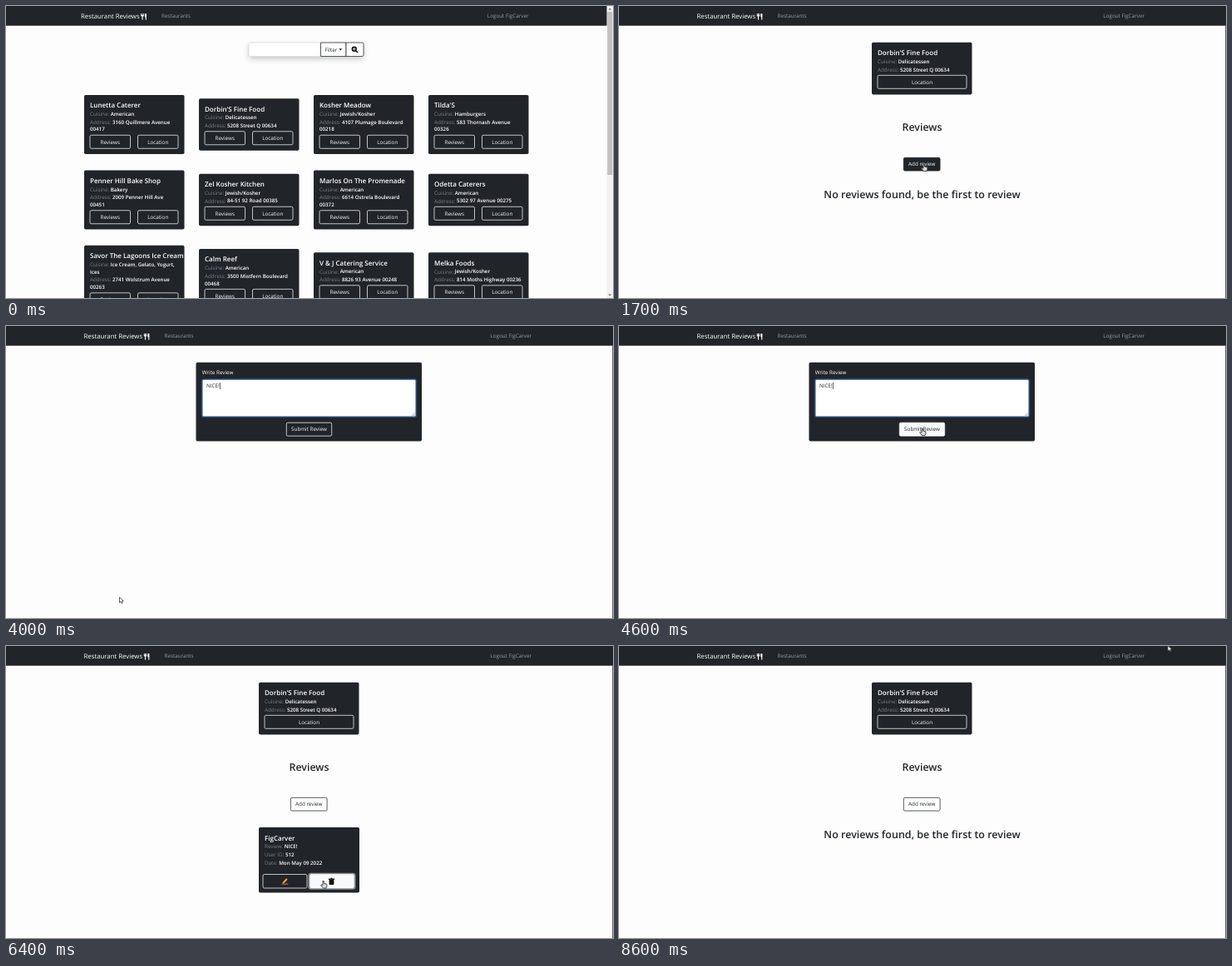
Animation, 730 px wide and 351 px high, one loop 9200 ms. Source, as an HTML page with a canvas:

```html
<!DOCTYPE html>
<html lang="en">
<head>
<meta charset="utf-8">
<title>Restaurant Reviews</title>
<style>
  html, body { margin: 0; width: 100%; height: 100%; overflow: hidden; background: #fdfdfd; }
  canvas { display: block; width: 730px; height: 351px; }
</style>
</head>
<body>
<canvas id="stage"></canvas>
<script>
const W = 730, H = 351, LOOP = 9200, STEP = 100;
const DARK = '#212529', LIGHT = '#f8f9fa', PAGE = '#fdfdfd', MUTED = '#7b8187';
const USER = 'FigCarver';
const SHOP = { name: "Dorbin'S Fine Food", cuisine: ['Delicatessen'], address: ['5208 Street Q 00634'] };

const canvas = document.getElementById('stage');
const dpr = window.devicePixelRatio || 1;
canvas.width = W * dpr;
canvas.height = H * dpr;
const ctx = canvas.getContext('2d');
ctx.scale(dpr, dpr);
ctx.textRendering = 'geometricPrecision';

const shop = (name, cuisine, address) =>
  ({ name, cuisine: cuisine.split('|'), address: address.split('|') });

const SHOPS = [
  shop('Lunetta Caterer', 'American', '3160 Quillmere Avenue|00417'),
  SHOP,
  shop('Kosher Meadow', 'Jewish/Kosher', '4107 Plumage Boulevard|00218'),
  shop("Tilda'S", 'Hamburgers', '583 Thornash Avenue|00326'),
  shop('Penner Hill Bake Shop', 'Bakery', '2009 Penner Hill Ave|00451'),
  shop('Zel Kosher Kitchen', 'Jewish/Kosher', '84-51 92 Road 00385'),
  shop('Marlos On The Promenade', 'American', '6614 Ostrela Boulevard|00372'),
  shop('Odetta Caterers', 'American', '5302 97 Avenue 00275'),
  shop('Savor The Lagoons Ice Cream', 'Ice Cream, Gelato, Yogurt,|Ices', '2741 Wolstrum Avenue|00263'),
  shop('Calm Reef', 'American', '3500 Mistfern Boulevard|00468'),
  shop('V & J Catering Service', 'American', '8826 93 Avenue 00248'),
  shop('Melka Foods', 'Jewish/Kosher', '814 Moths Highway 00236')
];

// Draws text with its capitals centred on y; returns the width.
function text(str, x, y, size = 6.3, color = '#fff', weight = 400, align = 'left') {
  ctx.font = `${weight} ${size}px "Open Sans", "Noto Sans", sans-serif`;
  ctx.textAlign = align;
  ctx.fillStyle = color;
  ctx.fillText(str, x, y + size * 0.36);
  return ctx.measureText(str).width;
}

function box(x, y, w, h, r, fill, stroke, line = 0.75) {
  ctx.beginPath();
  ctx.roundRect(x, y, w, h, r);
  if (fill) { ctx.fillStyle = fill; ctx.fill(); }
  if (stroke) { ctx.strokeStyle = stroke; ctx.lineWidth = line; ctx.stroke(); }
}

function shape(points, fill, stroke, line = 0.8) {
  ctx.beginPath();
  points.forEach(([x, y]) => ctx.lineTo(x, y));
  ctx.closePath();
  if (fill) { ctx.fillStyle = fill; ctx.fill(); }
  if (stroke) { ctx.strokeStyle = stroke; ctx.lineWidth = line; ctx.stroke(); }
}

function at(x, y, draw) {
  ctx.save();
  ctx.translate(x, y);
  draw();
  ctx.restore();
}

function button(label, x, y, w, h, { ink = LIGHT, fill = null, hover = false } = {}) {
  const hoverInk = ink === LIGHT ? DARK : '#fff';
  box(x, y, w, h, 1.6, hover ? ink : fill, ink);
  text(label, x + w / 2, y + h / 2, 6.3, hover ? hoverInk : ink, 400, 'center');
}

const card = (x, y, w, h) => box(x, y, w, h, 1.8, DARK);

// A muted label followed by bold lines; returns the next row position.
function field(label, lines, x, y) {
  const w = text(label + ' ', x, y, 6.3, MUTED);
  lines.forEach((line, i) => text(line, i ? x : x + w, y + i * 8.7, 6.2, '#fff', 600));
  return y + (lines.length - 1) * 8.7 + 9.6;
}

function shopCard(s, x, y, h, hover) {
  card(x, y, 120.5, h);
  text(s.name, x + 7, y + 12.5, 8, '#fff', 600);
  let row = field('Cuisine:', s.cuisine, x + 7, y + 23);
  row = field('Address:', s.address, x + 7, row) - 2.6;
  return row;
}

function fork(x, y) {
  at(x, y, () => {
    ctx.fillStyle = '#fff';
    for (const dx of [0, 1.3, 2.6]) ctx.fillRect(dx, -3.6, 0.8, 3);
    box(0, -1.6, 3.4, 1.6, 0.8, '#fff');
    ctx.fillRect(1.2, -0.6, 1.1, 4.6);
    box(4.6, -3.7, 2, 4.6, 0.9, '#fff');
    ctx.fillRect(5.4, 0, 1.1, 4);
  });
}

function navbar(dx) {
  ctx.fillStyle = DARK;
  ctx.fillRect(0, 0, W, 23.7);
  text('Restaurant Reviews', 90 + dx, 12.3, 7.8);
  fork(162.3 + dx, 12.6);
  text('Restaurants', 187 + dx, 12, 6.3, '#9b9d9f');
  text('Logout ' + USER, 628.5 + dx, 12, 6.3, '#9b9d9f', 400, 'right');
}

function search() {
  ctx.save();
  ctx.shadowColor = 'rgba(0,0,0,.22)';
  ctx.shadowBlur = 7 * dpr;
  ctx.shadowOffsetY = 3 * dpr;
  box(292, 44, 138, 16.5, 1.8, '#fff');
  ctx.restore();
  box(292, 44, 86.5, 16.5, 1.6, '#fff', '#ced4da', 0.6);
  box(378.5, 44, 30.5, 16.5, 0, '#fff', DARK);
  box(409, 44, 21, 16.5, [0, 1.6, 1.6, 0], '#fff', DARK);
  text('Filter', 383.5, 52.3, 6.3, DARK);
  shape([[400.3, 51.3], [404.3, 51.3], [402.3, 53.4]], DARK);
  ctx.strokeStyle = ctx.fillStyle = '#111';
  ctx.beginPath();
  ctx.arc(418.8, 51.8, 3.2, 0, 7);
  ctx.fill();
  ctx.lineWidth = 1.6;
  ctx.beginPath();
  ctx.moveTo(420.5, 53.5);
  ctx.lineTo(423, 56);
  ctx.stroke();
  ctx.fillStyle = '#fff';
  ctx.fillRect(417, 51.4, 3.6, 0.8);
  ctx.fillRect(418.4, 50, 0.8, 3.6);
}

function scrollbar() {
  ctx.fillStyle = '#f1f1f1';
  ctx.fillRect(722.5, 0, 7.5, H);
  ctx.fillStyle = '#c1c1c1';
  ctx.fillRect(723.2, 7, 6, 196);
  shape([[724.3, 4.6], [728, 4.6], [726.2, 2.6]], '#666');
  shape([[724.3, 346.4], [728, 346.4], [726.2, 348.4]], '#666');
}

function listPage(t) {
  navbar(0);
  search();
  SHOPS.forEach((s, i) => {
    const extra = s.cuisine.length + s.address.length - 2;
    const h = 62.7 + extra * 8.4;
    const x = 94 + (i % 4) * 138;
    const y = [142.5, 233, 327.6][i / 4 | 0] - h / 2;
    const row = shopCard(s, x, y, h);
    button('Reviews', x + 7, row, 48.5, 16, { hover: s === SHOP && t >= 400 });
    button('Location', x + 64.5, row, 48.5, 16);
  });
  scrollbar();
}

function innerPage() {
  navbar(3.5);
  ctx.fillStyle = '#4a4d50';
  ctx.fillRect(729.2, 23.7, 0.8, H);
}

function spinner(angle) {
  innerPage();
  ctx.strokeStyle = DARK;
  ctx.lineWidth = 1.8;
  ctx.beginPath();
  ctx.arc(359, 175.2, 9.8, angle + Math.PI / 4, angle + Math.PI * 7 / 4);
  ctx.stroke();
}

function pencil(x, y) {
  at(x, y, () => {
    shape([[-2.6, 1], [1.6, -3.4], [3.2, -1.9], [-1, 2.4], [-3, 2.7]], '#f2a33c');
    ctx.fillStyle = '#e8862e';
    ctx.fillRect(-3.8, 3, 7.6, 0.9);
  });
}

function trash(x, y, ink) {
  at(x, y, () => {
    box(-2.9, -2.2, 5.8, 6.2, 0.8, ink);
    ctx.fillRect(-3.7, -3.4, 7.4, 1.3);
    ctx.fillRect(-1.2, -4.2, 2.4, 1);
    ctx.fillStyle = '#f2a33c';
    ctx.fillRect(2.5, -2, 0.9, 2.2);
    ctx.fillRect(-3.5, -2, 0.8, 1.4);
  });
}

function reviewCard(hover) {
  card(304, 218, 121, 78.6);
  text(USER, 311, 231, 8, '#fff', 600);
  field('Review:', ['NICE!'], 311, 241.2);
  field('User ID:', ['512'], 311, 251);
  field('Date:', ['Mon May 09 2022'], 311, 260.7);
  box(309, 274.5, 53, 16.5, 1.6, null, LIGHT);
  pencil(335.5, 282.7);
  if (hover) box(364.3, 273.6, 55.4, 18.4, 2.4, null, '#8d9194', 1.6);
  box(365.5, 274.5, 53, 16.5, 1.6, hover ? LIGHT : null, LIGHT);
  trash(391.5, 283, hover ? '#111' : '#000');
}

function shopPage(t) {
  innerPage();
  const row = shopCard(SHOP, 304, 43.7, 62.7);
  button('Location', 311, row, 107, 16);
  text('Reviews', 364.5, 145.2, 12.4, DARK, 600, 'center');
  button('Add review', 342.3, 182.3, 43.8, 15.8, { ink: DARK, fill: '#fff', hover: t >= 1500 && t < 1800 });
  if (t >= 5500 && t < 6600) reviewCard(t >= 6200);
  else text('No reviews found, be the first to review', 364.5, 226.8, 12.5, DARK, 600, 'center');
}

function typed(t) {
  if (t < 3100) return 'addReview';
  if (t < 3600) return ['N', 'NI', 'NICE'][Math.min(2, Math.floor((t - 3100) / 100))];
  return 'NICE!';
}

function writePage(t) {
  innerPage();
  card(228.5, 43.7, 271.5, 94.8);
  text('Write Review', 235.7, 55.9);
  box(235.7, 64, 257.6, 45.3, 1.8, '#fff', '#2f4f86', 1.6);
  const value = typed(t);
  const w = text(value, 241, 72.2, 6.3, DARK);
  ctx.fillStyle = '#222';
  if (t < 3100) ctx.fillRect(241, 76, w, 0.6);
  ctx.fillRect(t < 3100 ? 240.6 : 241.3 + w, 68, 0.7, 8);
  ctx.strokeStyle = '#777';
  ctx.lineWidth = 0.6;
  ctx.beginPath();
  for (const d of [1.6, 3.6]) {
    ctx.moveTo(491.8 - d, 108);
    ctx.lineTo(491.8, 108 - d);
  }
  ctx.stroke();
  button('Submit Review', 337.3, 116.2, 54.4, 16, { hover: t >= 4500 });
}

const pointers = {
  arrow() {
    shape([[0, 0], [0, 6.6], [1.6, 5.2], [2.7, 7.4], [3.8, 6.8], [2.8, 4.8], [4.8, 4.6]], '#fff', '#333');
  },
  hand() {
    shape([[0, 0], [1.2, 0], [1.4, 3], [4.8, 3.8], [4.9, 6.2], [4, 8.6], [0.4, 8.6], [-2.4, 5], [-1.6, 4.2], [0, 5.2]],
      '#ddd', '#3a3a3a', 0.9);
  },
  beam() {
    ctx.fillStyle = '#555';
    ctx.fillRect(-0.3, -4, 0.7, 8);
  }
};

// Pointer strokes: start, end, from, to, pointer on arrival.
const MOVES = [
  [100, 500, [420, 235], [263, 160.5], 'hand'],
  [1000, 1500, [263, 160.5], [366, 190], 'hand'],
  [1800, 2100, [366, 190], [331, 104], 'beam'],
  [2100, 2600, [331, 104], [20, 130], 'arrow'],
  [3800, 4000, [20, 130], [136.5, 326], 'arrow'],
  [4000, 4600, [136.5, 326], [364, 123], 'hand'],
  [5700, 6300, [364, 123], [381, 282.5], 'hand'],
  [7000, 7600, [381, 282.5], [440, 255], 'arrow'],
  [7700, 8600, [440, 255], [660, -0.5], 'arrow']
];

function pointer(t) {
  const hidden = t < 100 || (t >= 3100 && t < 3800) || (t >= 4800 && t < 5700);
  if (hidden) return;
  const [start, end, from, to, kind] = MOVES.filter(m => m[0] <= t).pop();
  const p = Math.min(1, (t - start) / (end - start));
  const e = p * p * (3 - 2 * p);
  const gone = t >= 6600 && t < 7000;
  const look = p < 0.85 && kind !== 'beam' || gone ? 'arrow' : kind;
  at(from[0] + (to[0] - from[0]) * e, from[1] + (to[1] - from[1]) * e, pointers[look]);
}

function page(t) {
  const turn = ms => ms / 750 * Math.PI * 2;
  if (t < 600) listPage(t);
  else if (t < 1000) spinner(turn(t - 700));
  else if (t < 1800) shopPage(t);
  else if (t < 4800) writePage(t);
  else if (t < 5500) spinner(turn(t - 5200) + 1.95);
  else shopPage(t);
}

function frame(now) {
  const t = Math.floor(now % LOOP / STEP) * STEP;
  ctx.fillStyle = PAGE;
  ctx.fillRect(0, 0, W, H);
  page(t);
  pointer(t);
  requestAnimationFrame(() => frame(performance.now() - origin));
}

const origin = performance.now();
frame(0);
</script>
</body>
</html>
```
